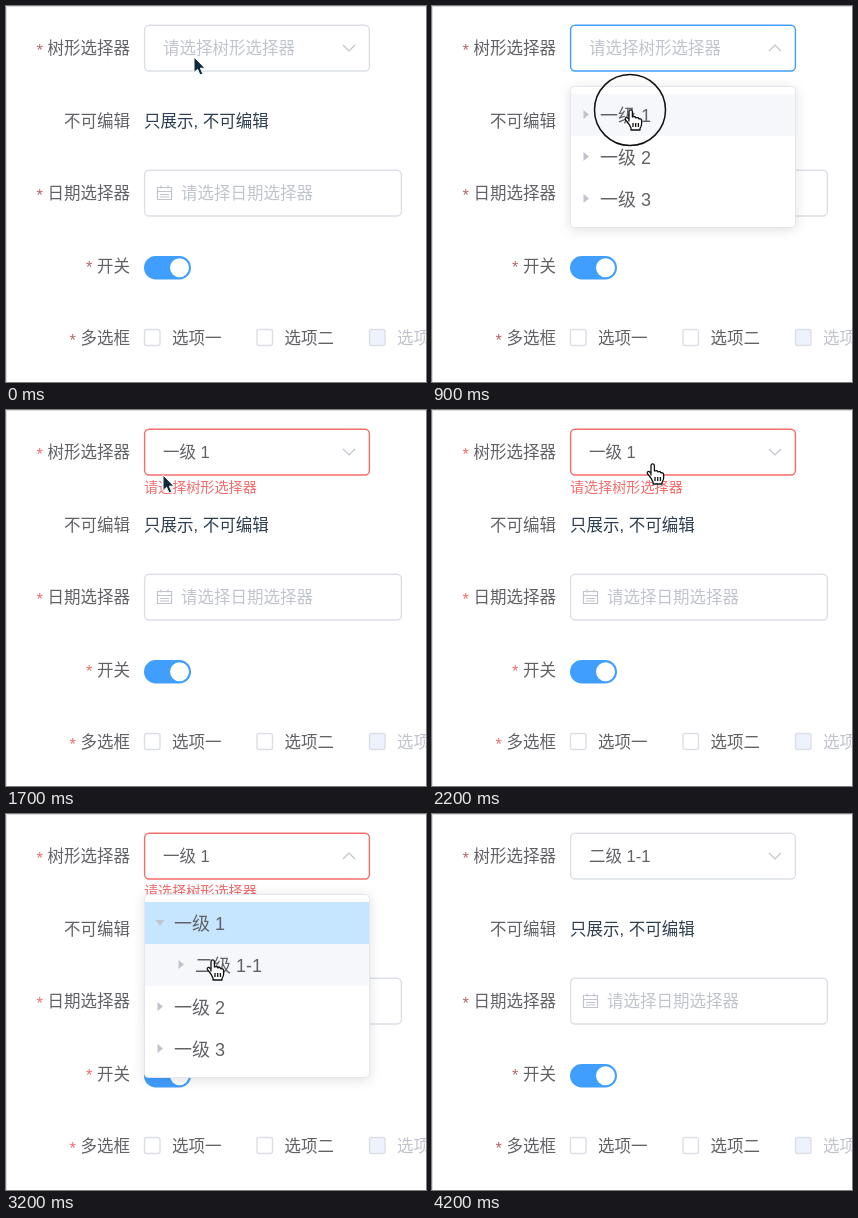
Recreate the animation shown at these times as an HTML page. Size 420 by 376 pixels, loop 4.3 s.

```html
<!DOCTYPE html>
<html lang="zh-CN">
<head>
<meta charset="utf-8">
<style>
  html, body { margin: 0; width: 100%; height: 100%; overflow: hidden; background: #fff; }
  svg { display: block; font: 16.5px "Liberation Sans", "Noto Sans CJK SC", "Noto Sans CJK", sans-serif; fill: #606266; }
  .box { fill: #fff; stroke: #dcdfe6; stroke-width: 1.4; }
  .hint { fill: #c0c4cc; }
  .line { fill: none; stroke: #c0c4cc; stroke-width: 1.2; }
  .dark { fill: #2c3e50; }
  .error { fill: #f56c6c; font-size: 14.1px; }
  #panel { font-size: 18px; }
</style>
</head>
<body>
<svg width="420" height="376" viewBox="0 0 420 376">
  <path d="M0 .5H420M.5 0V376" stroke="#dcdcdc"/>
  <g id="form"></g>
  <rect id="field" class="box" x="138.6" y="19.2" width="224.8" height="45.8" rx="4.500"/>
  <text id="value" x="157" y="48"></text>
  <path id="chevron" class="line" d="M-6-3 0 3 6-3"/>
  <text id="error" class="error" x="138" y="82">请选择树形选择器</text>
  <rect class="box" x="138.6" y="164.200" width="256.8" height="45.8" rx="4.500"/>
  <path class="line" d="M151.500 181.500h14v12h-14zM151.500 185.500h14M155 179.500v3M162 179.500v3M154 188.500h9M154 191h9"/>
  <text class="hint" x="175" y="193">请选择日期选择器</text>
  <rect x="138" y="250" width="47" height="23.500" rx="11.750" fill="#409eff"/>
  <circle cx="173.500" cy="261.750" r="9.500" fill="#fff"/>
  <g id="panel">
    <rect id="sheet" x="138.500" y="80.500" width="225" rx="4" fill="#fff" stroke="#e4e7ed"
      style="filter: drop-shadow(0 2px 6px rgba(0,0,0,.12))"/>
    <g id="rows"></g>
  </g>
  <circle id="ring" r="35.500" fill="none" stroke="#111" stroke-width="1.500"/>
  <path id="arrow" d="M0 0V15.500L3.600 12.300 6 18 8.800 16.800 6.400 11.200H11Z" fill="#0c2a3c" stroke="#fff"/>
  <g id="hand" fill="#fff" stroke="#111" stroke-width="1.300" stroke-linejoin="round">
    <path d="M-2 11V1.600a1.700 1.700 0 0 1 3.400 0V7q3-1 3.200 .8q3-.8 3.200 1q2.800-.4 2.800 1.800v3.400q0 2-1.600 4.500V20H0v-2q-1-3-4-6.500q-3-3-1-4q1.500-.3 3 2z"/>
    <path d="M2 13v4M4.700 13v4M7.400 13v4"/>
  </g>
</svg>
<script>
const LOOP = 4300, STEP = 100, ROW = 42, TOP = 80;
const $ = id => document.getElementById(id);
const text = (x, y, s, attrs = '') => `<text x="${x}" y="${y}" ${attrs}>${s}</text>`;

const labels = [['树形选择器', 48, 1], ['不可编辑', 120.500, 0], ['日期选择器', 193, 1], ['开关', 265.500, 1], ['多选框', 338, 1]];
const options = [['选项一', 138], ['选项二', 250.500], ['选项三', 363]];
$('form').innerHTML =
  labels.map(([s, y, required]) => text(124, y, s, 'text-anchor="end"') +
    (required ? text(119.500 - 16.500 * s.length, y + 1.500, '*', 'class="star" text-anchor="end"') : '')).join('') +
  text(138, 120.500, '只展示, 不可编辑', 'class="dark"') +
  options.map(([s, x], i) =>
    `<rect class="box" x="${x + .5}" y="323.500" width="15.500" height="16" rx="2"${i == 2 ? ' style="fill:#edf2fc"' : ''}/>` +
    text(x + 28, 338, s, i == 2 ? 'class="hint"' : '')).join('');

// Dropdown sessions: opening and selecting times, and their tree rows [label, depth]
const sessions = [
  { open: 350, close: 1050, rows: [['一级 1', 0], ['一级 2', 0], ['一级 3', 0]] },
  { open: 2550, close: 3250, expanded: true, rows: [['一级 1', 0], ['二级 1-1', 1], ['一级 2', 0], ['一级 3', 0]] },
];
const clicks = [[300, 400], [900, 1000], [3100, 3200]];
const path = [[0, 188, 51], [200, 203, 42], [500, 203, 42], [800, 199, 104], [1000, 199, 104], [1300, 157, 65],
  [1800, 157, 65], [2200, 221, 54], [2500, 213, 43], [2700, 213, 43], [3000, 207, 146], [3200, 207, 146],
  [3500, 169, 85], [3800, 160, 90], [4100, 0, 110]];

const clamp = v => Math.max(0, Math.min(1, v));
const easeOut = (v, power) => 1 - (1 - clamp(v)) ** power;
const within = (t, a, b) => t >= a && t < b;
const show = (id, on) => $(id).style.display = on ? '' : 'none';

function cursorAt(t) {
  const i = path.findIndex(p => p[0] > t);
  if (i < 0) return null;
  const [a, b] = [path[i - 1], path[i]], k = (t - a[0]) / (b[0] - a[0]);
  return [a[1] + (b[1] - a[1]) * k, a[2] + (b[2] - a[2]) * k];
}

function drawRow([label, depth], i, hovered, expanded) {
  const y = TOP + 8 + i * ROW, x = 154 + depth * 21;
  const current = expanded && i == 0;
  const fill = current ? '#c6e5ff' : hovered ? '#f5f7fa' : 'none';
  return `<rect x="139" y="${y}" width="224" height="${ROW}" fill="${fill}"/>
    <path d="M-2.500-4.500 3 0-2.500 4.500Z" fill="#c0c4cc" transform="translate(${x} ${y + 20.500})${current ? ' rotate(90)' : ''}"/>
    ${text(x + 14, y + 27.500, label)}`;
}

function draw(t) {
  const cursor = cursorAt(t);
  const session = sessions.find(s => within(t, s.open, s.close + 300));
  const invalid = within(t, 1050, 3250);

  let turn = 0;
  show('panel', session);
  if (session) {
    const { open, close, rows, expanded } = session;
    const phase = power => t < close ? easeOut((t - open) / 300, power) : 1 - easeOut((t - close) / 300, power);
    const scale = phase(5);
    turn = -180 * phase(2);
    const hover = cursor ? Math.floor((cursor[1] - TOP - 8) / ROW) : -1;
    $('sheet').setAttribute('height', rows.length * ROW + 15);
    $('rows').innerHTML = rows.map((r, i) => drawRow(r, i, i == hover, expanded)).join('');
    $('panel').setAttribute('transform', `translate(0 ${TOP}) scale(1 ${scale}) translate(0 ${-TOP})`);
    $('panel').setAttribute('opacity', scale);
  }
  $('chevron').setAttribute('transform', `translate(343 42) rotate(${turn})`);

  $('value').textContent = t < 1050 ? '请选择树形选择器' : t < 3250 ? '一级 1' : '二级 1-1';
  $('value').setAttribute('class', t < 1050 ? 'hint' : '');
  $('field').style.stroke = invalid ? '#f56c6c' : within(t, 350, 1050) ? '#409eff' : '#dcdfe6';
  show('error', invalid);
  document.querySelectorAll('.star').forEach(s => s.style.fill = invalid ? '#f56c6c' : '#b5656b');

  const pointing = within(t, 200, 1100) || within(t, 2000, 3300);
  show('hand', cursor && pointing);
  show('arrow', cursor && !pointing);
  show('ring', clicks.some(([a, b]) => within(t, a, b)));
  if (cursor) {
    const [x, y] = cursor;
    $('hand').setAttribute('transform', `translate(${x} ${y})`);
    $('arrow').setAttribute('transform', `translate(${x} ${y})`);
    $('ring').setAttribute('transform', `translate(${x - 1} ${y})`);
  }
}

function tick() {
  draw(Math.floor(performance.now() % LOOP / STEP) * STEP);
  requestAnimationFrame(tick);
}
tick();
</script>
</body>
</html>
```
